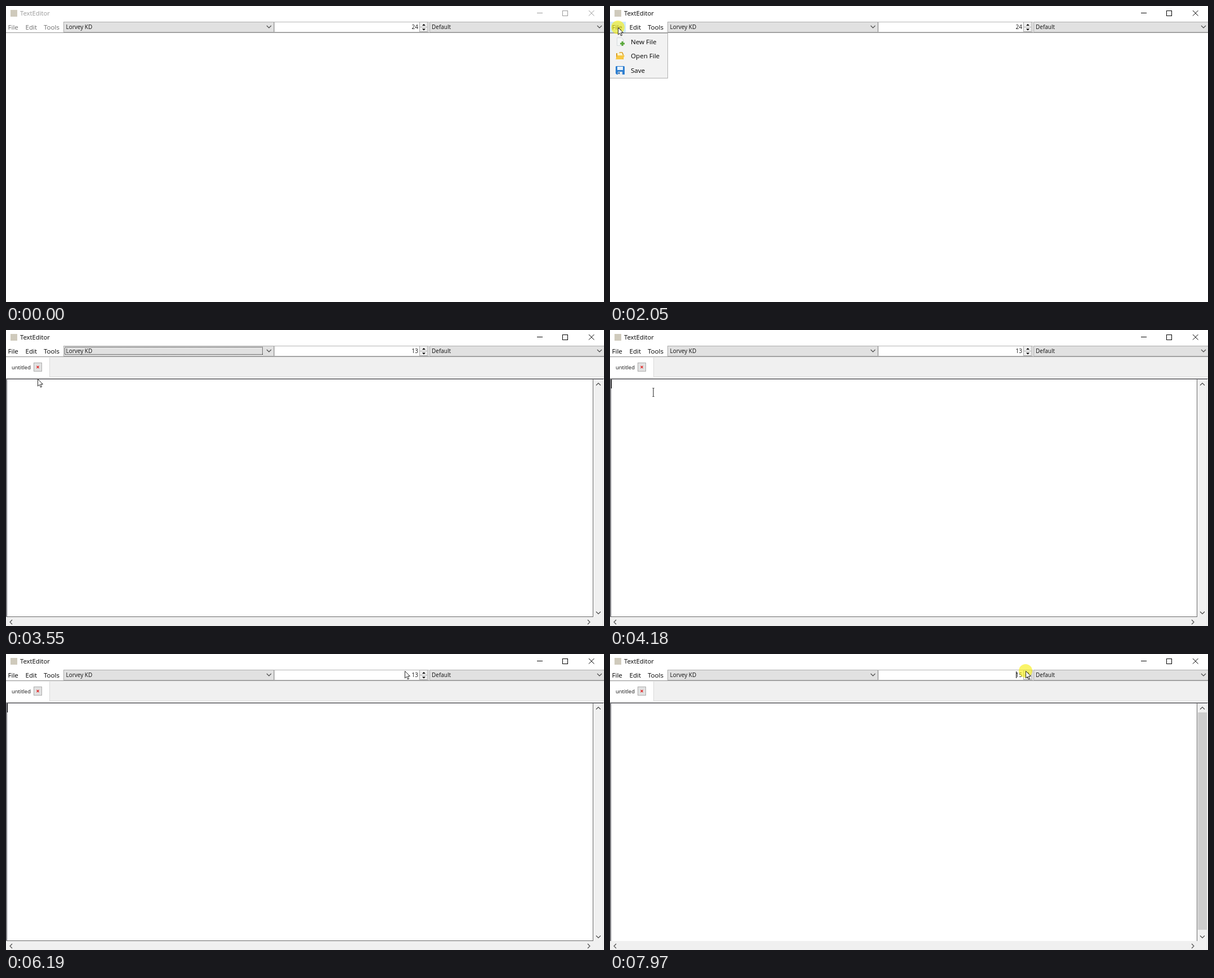
An HTML page for the animation above (8000 ms loop, 1062 px wide and 527 px high).

```html
<!DOCTYPE html>
<html lang="en">
<head>
<meta charset="utf-8">
<title>TextEditor</title>
<style>
  html, body { margin: 0; width: 100%; height: 100%; overflow: hidden; background: #fff; }
  svg { display: block; width: 1062px; height: 527px; }
  rect, .crisp { shape-rendering: crispEdges; }
  text { font-family: "Open Sans", "Noto Sans", sans-serif; fill: #000; white-space: pre; }
  .title { font-size: 11.3px; }
  .menu { font-size: 11.6px; }
  .field { font-size: 10px; fill: #111; }
  .line { fill: none; stroke: #000; }
  .arrow { fill: none; stroke: #444; stroke-width: 1.1; }
  .box { fill: #e1e1e1; stroke: #adadad; }
  .idle .title { fill: #999; }
  .idle .menu { fill: #6d6d6d; }
  .idle #buttons { stroke: #999; }
</style>
</head>
<body>
<svg id="win" class="idle" viewBox="0 0 1062 527">
  <!-- title bar -->
  <rect x="8" y="7" width="12" height="12" fill="#cfcabc"/>
  <text class="title" x="25" y="17">TextEditor</text>
  <g id="buttons" class="line">
    <path class="crisp" d="M943 12.5h10M988.5 8.5h9v9h-9z"/>
    <path d="M1035 8l9.500 9.500M1044.500 8l-9.500 9.500"/>
  </g>

  <!-- menu bar and fields -->
  <rect id="fileOn" y="28" width="28" height="19" fill="#cce8ff"/>
  <text class="menu" x="3.5" y="41.5">File</text>
  <text class="menu" x="34.5" y="41.5">Edit</text>
  <text class="menu" x="67" y="41.5">Tools</text>
  <rect class="box" x="102.5" y="28.5" width="373" height="18"/>
  <rect x="476.5" y="28.5" width="274" height="18" fill="#fff" stroke="#b4b4b4"/>
  <rect class="box" x="752.5" y="28.5" width="312" height="18"/>
  <rect y="47" width="1062" height="1" fill="#959595"/>
  <text class="field" x="106.5" y="41">Lorvey KD</text>
  <text class="field" x="756" y="41">Default</text>
  <text class="field" id="size" x="732" y="41" text-anchor="end">24</text>
  <rect id="focus" class="line" x="104.5" y="30.5" width="351" height="13" stroke-dasharray="1 1"/>
  <path class="arrow" d="M463 35l4 4 4-4M1050 35l4 4 4-4"/>
  <rect id="up" x="734.5" y="28.5" width="14" height="9" stroke="#adadad"/>
  <rect x="734.5" y="37.5" width="14" height="8" fill="#f0f0f0" stroke="#adadad"/>
  <path d="M739 35l3-3 3 3zM739 40.500l3 3 3-3z"/>
  <rect id="sizeCaret" x="721" y="31" width="1" height="12"/>

  <!-- document -->
  <g id="doc">
    <rect y="48" width="1062" height="479" fill="#f0f0f0"/>
    <rect y="84" width="1062" height="2" fill="#f9f9f9"/>
    <rect x="77" y="83" width="985" height="1" fill="#dcdcdc"/>
    <rect y="49" width="77" height="35" fill="#fff"/>
    <rect x="77" y="49" width="1" height="35" fill="#dcdcdc"/>
    <text class="field" x="10" y="69.5" style="font-size:9.4px">untitled</text>
    <rect class="box" x="49.5" y="58.5" width="14" height="15"/>
    <path d="M54.500 64l4 4M58.500 64l-4 4" stroke="#e02020" stroke-width="1.2"/>
    <!-- sunken frame -->
    <path class="crisp" d="M0 511V86h1062v1H1v424z" fill="#a0a0a0"/>
    <path class="crisp" d="M1 511V87h1060v1H2v423z" fill="#585860"/>
    <rect x="2" y="88" width="1040" height="423" fill="#fff"/>
    <rect x="1042" y="88" width="1" height="423" fill="#696969"/>
    <rect id="bottom" x="2" y="510" width="1041" height="1" fill="#696969"/>
    <rect x="1060" y="88" width="1" height="439" fill="#e3e3e3"/>
    <rect x="1061" y="87" width="1" height="440" fill="#fff"/>
    <rect id="thumb" x="1044" y="104" width="16" height="387" fill="#cdcdcd"/>
    <path class="arrow" d="M1048 98.500l4-4 4 4M1048 501.500l4 4 4-4M11 516l-4 4 4 4M1033 516l4 4-4 4"/>
    <rect id="caret" x="2" y="88" width="1" height="16"/>
  </g>

  <!-- File menu -->
  <g id="drop">
    <rect x="-.5" y="48.5" width="103" height="80" fill="#f2f2f2" stroke="#b0b0b0"/>
    <rect id="rowOn" x="1" y="50" width="100" height="26" fill="#91c9f7"/>
    <path d="M12.500 56.500h8l3 3v11h-11z" fill="#f4f6f6" stroke="#cdd4d6" stroke-width=".8"/>
    <path d="M22 63v8M18 67h8" stroke="#5aa83c" stroke-width="3"/>
    <path d="M11 84h5l1-2h5l2 4v9H11z" fill="#d99a1c"/>
    <path d="M13 84l8-1 2 5H13z" fill="#fff4c8"/>
    <path d="M13 88h13l-3 7H10z" fill="#f8c842"/>
    <path d="M11 107h14l1 1v14H12l-2-2v-12z" fill="#2f7fd0"/>
    <path d="M13 108h10v6H13z" fill="#e8f2fb"/>
    <path d="M14 117h8v5h-8z" fill="#dfe6ec"/>
    <path d="M15 118h2v3h-2z" fill="#245f9f"/>
    <text class="menu" x="37" y="67.5">New File</text>
    <text class="menu" x="37" y="93">Open File</text>
    <text class="menu" x="37" y="119">Save</text>
  </g>

  <!-- pointer -->
  <circle id="press" r="12" fill="#f8ee18" fill-opacity=".65"/>
  <g id="pointer">
    <path id="tip" d="M.5 .5v12.500l2.900-2.700 2.100 4.700 2-.9-2.100-4.600h4z" fill="#fff" stroke="#111" stroke-width=".9"/>
    <path id="beam" class="line" d="M-1.500-7.500h1l.5 .5 .5-.5h1M0-7v14M-1.500 7.500h1l.5-.5 .5 .5h1" stroke-width=".9"/>
  </g>
</svg>
<script>
const LOOP = 8000, STEP = 78;
const NEW_TAB = 3390, EDIT = 4030, RESIZE = 7880;

// pointer moves: time of first and last step, end point
const moves = [
  [110, 280, 478, 235], [510, 590, 223, 175], [820, 1050, 13, 31],
  [1510, 1810, 14, 38], [2530, 2760, 30, 56], [3470, 3550, 56, 87],
  [3620, 3880, 77, 111], [4650, 4810, 462, 68], [5040, 5190, 592, 44],
  [5500, 6270, 734, 27], [6340, 6730, 731, 28], [6880, 7340, 738, 30]
];
const presses = [[2050, 2300], [3000, 3230], [EDIT, 4180], [7730, LOOP]];

const $ = id => document.getElementById(id);
const show = (id, on) => { $(id).style.display = on ? "" : "none"; };
const between = (t, a, b) => t >= a && t < b;

function pointerAt(t) {
  let x = 960, y = 586;
  for (const [a, b, ex, ey] of moves) {
    if (t < a) break;
    const gaps = Math.round((b - a) / STEP);
    const done = Math.floor((t - a) / (b - a) * gaps + 0.001) + 1;
    const p = Math.min(1, done / (gaps + 1));
    x += (ex - x) * p;
    y += (ey - y) * p;
  }
  return [Math.round(x), Math.round(y)];
}

function sizeAt(t) {
  if (t < NEW_TAB) return 24;
  return t < RESIZE ? 13 : 14 + Math.floor((t - RESIZE) / 90);
}

function draw(t) {
  const [x, y] = pointerAt(t);
  const menu = between(t, 2050, 3310);
  const doc = t >= NEW_TAB;
  const resized = t >= RESIZE;
  const inText = doc && y > 89;
  const overUp = doc && x >= 734 && y < 38;

  $("win").classList.toggle("idle", t < 2050);
  show("fileOn", menu);
  show("drop", menu);
  show("rowOn", y >= 50);
  show("doc", doc);
  show("focus", between(t, NEW_TAB, EDIT));
  show("caret", t >= EDIT && (t - EDIT) % 1000 < 470);
  show("bottom", !resized);
  show("thumb", resized);
  show("sizeCaret", resized);
  $("size").textContent = sizeAt(t);
  $("up").setAttribute("fill", overUp ? "#e5f1fb" : "#f0f0f0");

  show("press", presses.some(([a, b]) => between(t, a, b)));
  show("pointer", t >= 110);
  show("tip", !inText);
  show("beam", inText);
  for (const id of ["press", "pointer"]) $(id).setAttribute("transform", `translate(${x} ${y})`);
}

const start = performance.now();
function tick() {
  draw((performance.now() - start) % LOOP);
  requestAnimationFrame(tick);
}
draw(0);
requestAnimationFrame(tick);
</script>
</body>
</html>
```
